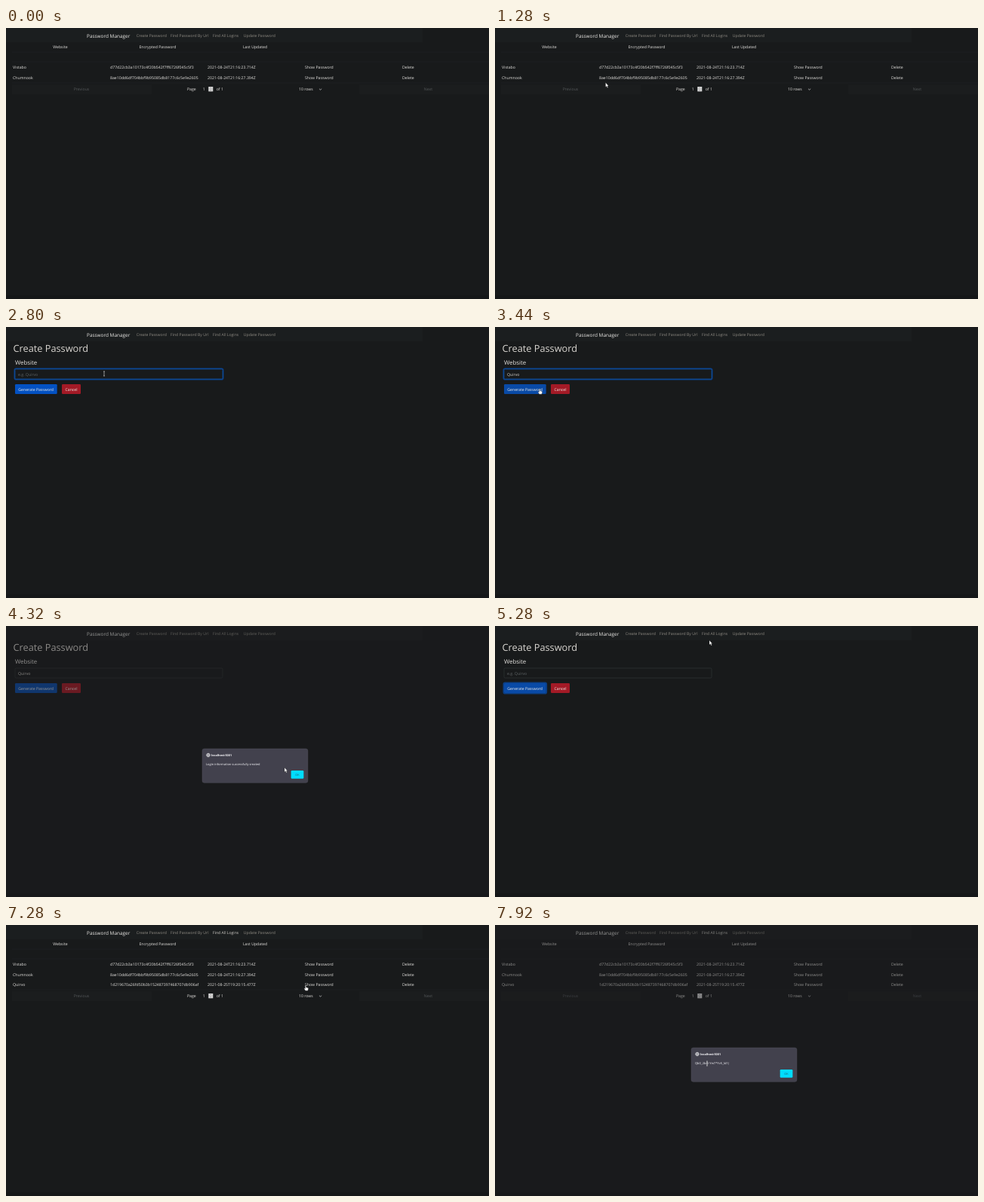
An HTML page for the animation above (8000 ms loop, 640 px wide and 360 px high).

```html
<!DOCTYPE html>
<html lang="en">
<head>
<meta charset="utf-8">
<title>Password Manager</title>
<style>
  html, body { margin: 0; width: 100%; height: 100%; overflow: hidden; background: #181a1b; }
  svg { display: block; width: 640px; height: 360px; }
  text { font: 5.2px "Open Sans", "Noto Sans", sans-serif; fill: #e4e2df; text-rendering: geometricPrecision; white-space: pre; }
  .mid { text-anchor: middle; }
  .nav text { font-size: 5.15px; fill: #8f8b84; }
  .nav text.on { fill: #d0cdc8; }
  .nav .brand { font-size: 6.45px; fill: #eceae7; }
  .off { fill: #55585a; }
  .line { stroke: #212425; stroke-width: .6; }
  .btn { font-size: 5.15px; fill: #f0eeeb; }
  .msg { font-size: 4px; fill: #fbfbfe; }
</style>
</head>
<body>
<svg viewBox="0 0 640 360">
  <rect width="640" height="360" fill="#181a1b"/>
  <rect y="355.500" width="640" height="4.500" fill="#151718"/>
  <g class="nav">
    <rect width="552" height="19" fill="#1b1e1f"/>
    <text class="brand" x="107" y="12.700">Password Manager</text>
    <text id="createLink" x="172.700" y="12">Create Password</text>
    <text x="218" y="12">Find Password By Url</text>
    <text id="listLink" x="274" y="12">Find All Logins</text>
    <text x="314.800" y="12">Update Password</text>
  </g>

  <g id="list">
    <path class="line" d="M8 32H640M8 45H640"/>
    <g class="mid">
      <text x="72" y="27.200">Website</text>
      <text x="201" y="27.200">Encrypted Password</text>
      <text x="330" y="27.200">Last Updated</text>
    </g>
    <g id="rows"></g>
    <g id="pager">
      <path class="line" d="M8 73H640"/>
      <path d="M8 75H193V88H8ZM468 75H640V88H468Z" fill="#1b1d1e"/>
      <text class="mid off" x="100" y="83.400">Previous</text>
      <text x="240" y="83.400">Page</text>
      <text x="260.700" y="83.400">1</text>
      <rect x="268.300" y="78" width="6" height="6.300" fill="#d6d6d6"/>
      <path d="M270.300 80.400l1-1 1 1M270.300 82l1 1 1-1" fill="none" stroke="#555" stroke-width=".5"/>
      <text x="278.700" y="83.400">of 1</text>
      <text x="388" y="83.400">10 rows</text>
      <path d="M415 80.700l1.600 1.500 1.600-1.500" fill="none" stroke="#ddd" stroke-width=".7"/>
      <text class="mid off" x="559.500" y="83.400">Next</text>
    </g>
  </g>

  <g id="form">
    <text x="9.500" y="33.200" style="font-size:12.75px;fill:#d8d5d0">Create Password</text>
    <text x="12" y="49.800" style="font-size:7.850px">Website</text>
    <rect id="glow" x="11.300" y="55.300" width="276.400" height="14.400" rx="2" fill="none" stroke="#0b3f86" stroke-width="1.600"/>
    <rect id="field" x="12" y="56" width="275" height="13" rx="1.300" fill="#181a1b" stroke-width=".6"/>
    <text id="entry" x="16" y="64.900"></text>
    <rect id="ring" x="11.300" y="75.300" width="57" height="14.400" rx="2" fill="none" stroke="#0b3f86" stroke-width="1.600"/>
    <rect id="generate" x="12" y="76" width="55.700" height="13" rx="1.300"/>
    <text class="mid btn" x="39.700" y="84.800">Generate Password</text>
    <rect x="74" y="76" width="25" height="13" rx="1.300" fill="#a31a26"/>
    <text class="mid btn" x="86.500" y="84.800">Cancel</text>
  </g>

  <g id="dialog">
    <rect width="640" height="360" fill="#1b1b1d" opacity=".42"/>
    <rect x="260" y="163" width="140" height="45.300" rx="2.700" fill="#42414d" stroke="#52525e" stroke-width=".4"/>
    <g fill="none" stroke="#fbfbfe" stroke-width=".6">
      <circle cx="268" cy="171.500" r="2.300"/>
      <ellipse cx="268" cy="171.500" rx="1" ry="2.300"/>
      <path d="M265.700 171.500h4.600"/>
    </g>
    <text class="msg" x="272" y="173" style="font-size:3.800px;font-weight:700">localhost:5001</text>
    <text id="message" class="msg" x="265" y="185.300"></text>
    <rect x="377.700" y="192" width="16.700" height="10.700" rx="1.300" fill="#00ddff"/>
    <text class="mid" x="386" y="198.700" style="font-size:3.800px;fill:#1d5a68">OK</text>
  </g>

  <g id="cursor">
    <path id="arrow" d="M0 0V6l1.400-1.200 1 2.100 1-.5-1-2H4Z" fill="#fff" stroke="#111" stroke-width=".3"/>
    <path id="hand" d="M-.6.500Q0-.4.600.500V2.800l2.600.7q.6.300.4 1.300L3 7.200H-.3L-2 4.600q0-.8.7-.5l.7.600Z" fill="#fff" stroke="#111" stroke-width=".3"/>
    <path id="beam" d="M-1-3H1M0-3V3M-1 3H1" fill="none" stroke="#ddd" stroke-width=".6"/>
  </g>
</svg>
<script>
const $ = id => document.getElementById(id);
const show = (id, on) => $(id).setAttribute('display', on ? 'inline' : 'none');
const LOOP = 8000, STEP = 80, SITE = 'Quirvo';

const logins = [
  ['Vistabo', 'd77d22cb3a10173c4f20b542f7ff6726f045c5f3', '2021-08-24T21:16:23.714Z'],
  ['Chumnook', '8ae10dd6df704bbf9b95085db8177c6c5e9e2605', '2021-08-24T21:16:27.394Z'],
  [SITE, '1d219670a26fd50b3b152487397468707db906af', '2021-08-25T19:20:15.477Z']
];
const columns = [9, 138, 267, 396, 525];
$('rows').innerHTML = logins.map((login, i) => '<g>' +
  [...login, 'Show Password', 'Delete'].map((s, c) =>
    `<text x="${columns[c]}" y="${54.2 + 13.4 * i}">${s}</text>`).join('') + '</g>').join('');

// Pointer stops: time, x, y, shape from then on
const stops = [
  [400, 420, 228, 'arrow'], [800, 262, 110, 'arrow'], [1200, 140, 64, 'arrow'],
  [1440, 165, 97, 'arrow'], [1680, 255, 50, 'arrow'], [1920, 198.7, 12, 'hand'],
  [2160, 198.7, 12, 'arrow'], [2480, 130, 62, 'beam'], [3200, 130, 62, 'arrow'],
  [3440, 59, 82, 'hand'], [3760, 59, 82, 'arrow'], [4320, 369, 188, 'arrow'],
  [4560, 386, 196, 'arrow'], [4720, 386, 196, 'arrow'], [5280, 284, 19, 'arrow'],
  [5520, 284.5, 11.5, 'hand'], [5680, 284.5, 11.5, 'arrow'], [6160, 62, 82, 'arrow'],
  [6560, 24, 84, 'arrow'], [7200, 397, 80, 'hand'], [7440, 397, 80, 'arrow'],
  [7920, 281, 184, 'beam'], [LOOP, 281, 184, 'beam']
];

function drawCursor(t) {
  show('cursor', t >= 400);
  if (t < 400) return;
  const i = stops.findIndex(s => s[0] > t);
  const [t0, x0, y0, shape] = stops[i - 1], [t1, x1, y1] = stops[i];
  const p = (t - t0) / (t1 - t0), e = p * p * (3 - 2 * p);
  $('cursor').setAttribute('transform', `translate(${x0 + (x1 - x0) * e} ${y0 + (y1 - y0) * e})`);
  for (const s of ['arrow', 'hand', 'beam']) show(s, s === shape);
}

function draw(t) {
  const during = (a, b) => t >= a && t < b;
  const form = during(2080, 5600), saved = t >= 5600, focus = during(2560, 3520);
  show('list', !form);
  show('form', form);
  $('rows').lastChild.setAttribute('display', saved ? 'inline' : 'none');
  $('pager').setAttribute('transform', `translate(0 ${saved ? 13 : 0})`);
  $('createLink').classList.toggle('on', during(1920, 2560));
  $('listLink').classList.toggle('on', t >= 5440);

  const typed = during(2960, 4800) ? SITE.slice(0, 1 + Math.floor((t - 2960) / 55)) : '';
  $('entry').textContent = typed || 'e.g. ' + SITE;
  $('entry').style.fill = typed ? '#dad7d2' : '#5f6466';
  $('field').setAttribute('stroke', focus ? '#0f5bb8' : '#34393b');
  show('glow', focus);
  show('ring', t >= 4800);
  $('generate').setAttribute('fill', t >= 3360 ? '#094aa6' : '#0351c2');

  show('dialog', during(3680, 4800) || t >= 7360);
  $('message').textContent = form ? 'Login information successfully created' : 'Qb0_2b@-Ym7*Yv5_ld1(';
  drawCursor(t);
}

function tick(now) {
  draw(Math.floor(now % LOOP / STEP) * STEP);
  requestAnimationFrame(tick);
}
draw(0);
requestAnimationFrame(tick);
</script>
</body>
</html>
```
